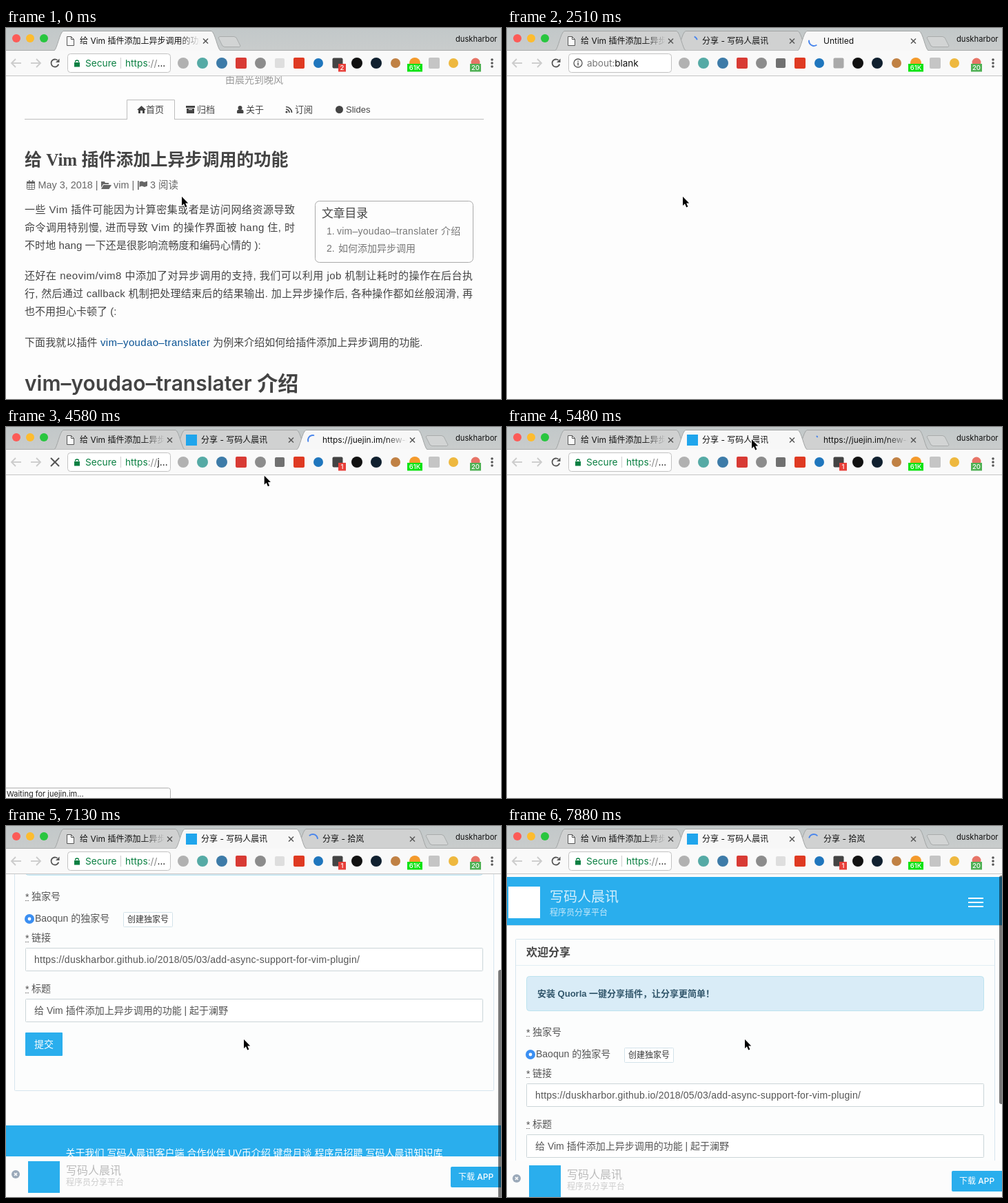
Recreate the animation shown at these times as an HTML page with a canvas. Size 718 px wide and 539 px high, loop 8 s.

```html
<!DOCTYPE html>
<html lang="zh">
<head>
<meta charset="utf-8">
<style>
html, body { margin: 0; width: 100%; height: 100%; overflow: hidden; background: #fff; }
canvas { display: block; width: 718px; height: 539px; }
</style>
</head>
<body>
<canvas id="stage"></canvas>
<script>
const W = 718, H = 539, LOOP = 8000, STEP = 148.6;
const canvas = document.getElementById('stage');
const ctx = canvas.getContext('2d');
const ratio = window.devicePixelRatio || 1;
canvas.width = W * ratio;
canvas.height = H * ratio;

const CJK = '"Noto Sans CJK SC", "Noto Sans CJK", sans-serif';
const UI = 'Inter, ' + CJK;
const PAGE = '"Liberation Sans", ' + CJK;
const SERIF = '"Liberation Serif", ' + CJK;
const BLUE = '#2aaeed';
const SITE = '写码人晨讯';
const USER = 'duskharbor';
const POST = '给 Vim 插件添加上异步调用的功能';

// ---- drawing helpers ----
function rect(x, y, w, h, fill) {
  ctx.fillStyle = fill;
  ctx.fillRect(x, y, w, h);
}

function box(x, y, w, h, r, fill, stroke) {
  const inset = stroke ? 0.5 : 0;
  ctx.beginPath();
  ctx.roundRect(x + inset, y + inset, w - 2 * inset, h - 2 * inset, r);
  if (fill) { ctx.fillStyle = fill; ctx.fill(); }
  if (stroke) { ctx.strokeStyle = stroke; ctx.lineWidth = 1; ctx.stroke(); }
}

function disc(x, y, r, fill) {
  ctx.beginPath();
  ctx.arc(x, y, r, 0, 7);
  ctx.fillStyle = fill;
  ctx.fill();
}

function poly(points, fill, stroke, width = 1, closed = true) {
  ctx.beginPath();
  points.forEach(([x, y]) => ctx.lineTo(x, y));
  if (closed) ctx.closePath();
  if (fill) { ctx.fillStyle = fill; ctx.fill(); }
  if (stroke) { ctx.strokeStyle = stroke; ctx.lineWidth = width; ctx.stroke(); }
}

function line(x1, y1, x2, y2, color, width = 1) {
  poly([[x1, y1], [x2, y2]], null, color, width, false);
}

// y is the vertical centre of the line of text
function text(str, x, y, size, color, opt = {}) {
  ctx.font = `${opt.weight || 400} ${size}px ${opt.font || PAGE}`;
  ctx.textAlign = opt.align || 'left';
  ctx.letterSpacing = (opt.spacing || 0) + 'px';
  ctx.fillStyle = color;
  if (opt.column) {
    const extra = opt.column - ctx.measureText(str).width;
    ctx.letterSpacing = extra / (str.length - 1) + 'px';
  }
  ctx.fillText(str, x, Math.round(y + size * 0.34));
  const width = ctx.measureText(str).width;
  ctx.letterSpacing = '0px';
  return x + width;
}

// ---- timing helpers ----
const smooth = u => u * u * (3 - 2 * u);

function track(k, keys, ease = u => u) {
  if (k <= keys[0][0]) return keys[0][1];
  for (let i = 1; i < keys.length; i++) {
    const [k0, a] = keys[i - 1], [k1, b] = keys[i];
    if (k <= k1) return a + (b - a) * ease((k - k0) / (k1 - k0));
  }
  return keys[keys.length - 1][1];
}

// ---- blog page ----
function blogIcons() {
  const c = '#444', m = '#666';
  poly([[190, 119], [196.5, 113], [203, 119], [201, 119], [201, 124], [198, 124], [198, 120],
    [195, 120], [195, 124], [192, 124], [192, 119]], c);
  rect(261, 113, 13, 3, c);
  rect(262, 117, 11, 7, c);
  rect(265, 118, 5, 1, '#fff');
  disc(339.5, 116, 3, c);
  ctx.beginPath();
  ctx.roundRect(335, 118.5, 9.5, 5.5, [3, 3, 1, 1]);
  ctx.fill();
  disc(407, 122, 1.6, c);
  for (const r of [5, 8.5]) {
    ctx.beginPath();
    ctx.arc(406, 123, r, -Math.PI / 2, 0);
    ctx.strokeStyle = c;
    ctx.lineWidth = 1.7;
    ctx.stroke();
  }
  disc(483.5, 118.5, 5.5, c);

  box(30, 223, 12, 12, 1, null, m);
  rect(30, 223, 12, 3, m);
  for (const x of [33, 38]) rect(x, 221, 1.5, 4, m);
  for (const x of [33.5, 37.5]) line(x, 226, x, 234, m, 0.7);
  for (const y of [228.5, 231.5]) line(31, y, 41, y, m, 0.7);
  poly([[138, 223], [143, 223], [144, 225], [149, 225], [149, 227], [141, 227], [138, 232]], m);
  poly([[141.5, 228], [153, 228], [149.5, 234], [138, 234]], m);
  rect(191, 222, 1.6, 13, m);
  poly([[193.5, 223.5], [197, 222.5], [200.5, 224], [205, 222.5], [205, 229.5], [201, 231],
    [197, 229.5], [193.5, 231]], m);
}

function blog() {
  const ink = '#444', soft = '#666';
  text('由晨光到晚风', 318, 75, 14, '#999');
  line(27, 132.5, 693, 132.5, '#bdbdbd');
  rect(175, 104, 70, 30, '#fdfdfd');
  poly([[175.5, 133], [175.5, 104.5], [244.5, 104.5], [244.5, 133]], null, '#bdbdbd', 1, false);
  [['首页', 203], ['归档', 277], ['关于', 348], ['订阅', 419], ['Slides', 493]]
    .forEach(([s, x]) => text(s, x, 118.5, 13, ink));
  text(POST, 27, 191.5, 25, ink, { weight: 700, font: SERIF });
  text('May 3, 2018 |', 46.5, 228, 14.4, soft);
  text('vim |', 156, 228, 14.4, soft);
  text('3 阅读', 209, 228, 14.4, soft);
  blogIcons();

  const narrow = { column: 392 }, wide = { column: 650 };
  text('一些 Vim 插件可能因为计算密集或者是访问网络资源导致', 27, 264, 15, ink, narrow);
  text('命令调用特别慢, 进而导致 Vim 的操作界面被 hang 住, 时', 27, 290, 15, ink, narrow);
  text('不时地 hang 一下还是很影响流畅度和编码心情的 ):', 27, 316, 15, ink, { spacing: 0.1 });
  text('还好在 neovim/vim8 中添加了对异步调用的支持, 我们可以利用 job 机制让耗时的操作在后台执',
    27, 360, 15, ink, wide);
  text('行, 然后通过 callback 机制把处理结束后的结果输出. 加上异步操作后, 各种操作都如丝般润滑, 再',
    27, 386, 15, ink, wide);
  text('也不用担心卡顿了 (:', 27, 412, 15, ink);
  let x = text('下面我就以插件 ', 27, 457, 15, ink, { spacing: 0.1 });
  x = text('vim–youdao–translater', x, 457, 15, '#0b5394', { spacing: 0.35 });
  text(' 为例来介绍如何给插件添加上异步调用的功能.', x, 457, 15, ink);
  text('vim–youdao–translater 介绍', 27, 517, 30, ink, { weight: 600, font: UI });

  box(448, 251, 230, 90, 6, '#fdfdfd', '#aaa');
  text('文章目录', 458, 269.5, 16.8, ink);
  text('1.', 465, 295, 14, '#777');
  text('vim–youdao–translater 介绍', 480, 295, 14, '#777', { spacing: 0.25 });
  text('2.', 465, 320, 14, '#777');
  text('如何添加异步调用', 482, 320, 14, '#777');
}

// ---- share page ----
function label(str, y) {
  text('*', 28, y + 1, 14, '#555');
  for (let x = 28; x < 33; x += 2) rect(x, y + 6, 1, 1, '#555');
  text(str, 37, y, 14, '#555');
}

function field(str, y, spacing = 0) {
  box(28, y, 664, 34, 1, '#fff', '#cbd5d8');
  text(str, 41, y + 17, 14, '#555', { spacing });
}

function form() {
  rect(0, 70, W, 70, BLUE);
  rect(0, 140, W, 1, '#cfdfe6');
  rect(2, 84, 46, 46, '#fff');
  text(SITE, 62, 99, 20, '#d4effc', { weight: 300 });
  text('程序员分享平台', 62, 122, 12, '#c4e8fa', { weight: 300 });
  for (const y of [100, 106, 112]) rect(669, y, 22, 2, '#fff');

  box(12, 160, 696, 418, 1, '#fcfdfd', '#d6e5ee');
  text('欢迎分享', 28, 180, 16, '#444', { weight: 600 });
  rect(13, 198, 694, 1, '#e2eef4');
  box(28, 214, 664, 51, 4, '#d9ecf7', '#bce3ef');
  text('安装 Quorla 一键分享插件，让分享更简单！', 44, 240, 13, '#31566b', { weight: 700 });
  label('独家号', 295);
  disc(34, 328, 7, '#3b8ff2');
  disc(34, 328, 2.4, '#fff');
  text('Baoqun 的独家号', 42, 327.5, 14, '#555');
  box(170, 318, 72, 22, 1, '#fff', '#d3e3ea');
  text('创建独家号', 176, 329, 12, '#333');
  label('链接', 355);
  field(`https://${USER}.github.io/2018/05/03/add-async-support-for-vim-plugin/`, 370, 0.23);
  label('标题', 429);
  field(POST + ' | 起于澜野', 444);
  box(28, 493, 54, 34, 1, BLUE);
  text('提交', 55, 510, 14, '#fff', { align: 'center', weight: 500 });
  rect(0, 628, W, 120, BLUE);
  text(`关于我们 ${SITE}客户端 合作伙伴 UV币介绍 键盘月谈 程序员招聘 ${SITE}知识库`,
    360, 668, 14, '#fff', { align: 'center' });
}

function appBar() {
  rect(0, 482, W, 70, '#fcfcfc');
  disc(14, 508, 6, '#9ba9b9');
  line(12, 506, 16, 510, '#fff', 1.6);
  line(16, 506, 12, 510, '#fff', 1.6);
  rect(32, 489, 46, 46, BLUE);
  text(SITE, 87, 503, 16, '#bbb', { weight: 300 });
  text('程序员分享平台', 87, 520, 12, '#ccc', { weight: 300 });
  box(645, 497, 76, 30, 2, BLUE);
  text('下载 APP', 656, 512, 12, '#fff', { weight: 500, font: UI });
}

function sharePage(k) {
  const range = 191;
  const scroll = track(k, [[41, 0], [42, -24], [43, -110], [44, -178], [45, -193],
    [46, -191], [47, -150], [48, -75], [49, -8], [50, 4]]);
  const bounce = scroll > 0 ? scroll : Math.min(0, scroll + range);
  ctx.save();
  ctx.translate(0, scroll);
  form();
  ctx.restore();
  ctx.save();
  ctx.translate(0, bounce);
  appBar();
  ctx.restore();
  if (k > 41) {
    const top = 71.5 - scroll * 136 / range;
    ctx.beginPath();
    ctx.roundRect(714, Math.max(72, top), 6, 332, 3);
    ctx.fillStyle = 'rgba(0,0,0,.52)';
    ctx.fill();
  }
}

// ---- browser frame ----
function spinner(x, y, k, k0, angle) {
  const t = (k - k0) * STEP, half = 666, turn = Math.floor(t / (2 * half));
  const phase = t / half - 2 * turn;
  const grow = smooth(Math.min(1, phase)), shrink = smooth(Math.max(0, phase - 1));
  const start = angle + t * 360 / 1568 + 265 * (turn + shrink);
  const rad = Math.PI / 180;
  ctx.beginPath();
  ctx.arc(x, y, 7, start * rad, (start + 8 + 265 * (grow - shrink)) * rad);
  ctx.strokeStyle = '#4a86ec';
  ctx.lineWidth = 2;
  ctx.lineCap = 'round';
  ctx.stroke();
  ctx.lineCap = 'butt';
}

function tab(x, w, drop, active, title, icon) {
  ctx.save();
  ctx.beginPath();
  ctx.rect(0, 0, W, 33);
  ctx.clip();
  ctx.translate(x, drop);
  ctx.beginPath();
  ctx.moveTo(0, 32.5);
  ctx.bezierCurveTo(4, 31, 8, 6, 13, 4.5);
  ctx.lineTo(w - 13, 4.5);
  ctx.bezierCurveTo(w - 8, 6, w - 4, 31, w, 32.5);
  ctx.fillStyle = active ? '#f7f7f7' : '#d0d1d1';
  ctx.fill();
  ctx.strokeStyle = '#a2a5a5';
  ctx.lineWidth = 1;
  ctx.stroke();
  if (active) rect(1, 32, w - 2, 1, '#f7f7f7');

  const fade = ctx.createLinearGradient(w - 60, 0, w - 29, 0);
  fade.addColorStop(0, '#111');
  fade.addColorStop(1, 'rgba(17,17,17,0)');
  ctx.save();
  ctx.beginPath();
  ctx.rect(30, 0, w - 59, 33);
  ctx.clip();
  text(title, 37, 19, 12, fade, { font: UI });
  ctx.restore();
  line(w - 25, 15.5, w - 18, 22.5, '#555', 1.4);
  line(w - 18, 15.5, w - 25, 22.5, '#555', 1.4);
  icon();
  ctx.restore();
}

function docIcon() {
  poly([[18.5, 12.5], [24.5, 12.5], [28.5, 16.5], [28.5, 25.5], [18.5, 25.5]], '#fafafa', '#555');
  poly([[24.5, 12.5], [24.5, 16.5], [28.5, 16.5]], null, '#555', 1, false);
}

function tabStrip(k) {
  const bg = ctx.createLinearGradient(0, 0, 0, 33);
  bg.addColorStop(0, '#c2c8c9');
  bg.addColorStop(1, '#c9cccc');
  rect(0, 0, W, 33, bg);
  ['#fc5b57', '#fdbc2f', '#28c63f'].forEach((c, i) => disc(15 + 20 * i, 15, 6, c));
  text(USER, 652, 16, 11.2, '#111', { font: UI });

  const nx = k < 7 ? 308 : 609;
  poly([[nx + 2, 12.5], [nx + 23, 12.5], [nx + 26, 14], [nx + 32, 26], [nx + 31, 27.5],
    [nx + 9, 27.5], [nx + 6, 26], [nx, 14]], '#d2d4d4', '#a9acac');
  line(0, 32.5, W, 32.5, '#a9acac');

  const pitch = k < 7 ? 228 : track(k, [[7, 228], [8, 194], [9, 176]]);
  const w = pitch + 13;
  const active = k < 7 ? 0 : k < 30 ? 2 : 1;
  const loaded = k >= 27;
  const tabs = [() => tab(70, w, 0, active === 0, POST, docIcon)];
  if (k >= 7) tabs.push(() => tab(70 + pitch, w, k === 7 ? 4 : 0, active === 1,
    k < 14 ? 'Untitled' : '分享 - ' + SITE, () => {
      if (loaded) rect(15, 11, 16, 16, '#1fa5ec');
      else if (k < 14) spinner(23, 19, k, 7, -90);
      else spinner(23, 19, k, 22, 117);
    }));
  if (k >= 8) tabs.push(() => tab(70 + 2 * pitch, w, k === 8 ? 4 : 0, active === 2,
    k < 15 ? 'Untitled' : k < 38 ? 'https://juejin.im/new-entry' : '分享 - 拾岚',
    () => spinner(23, 19, k, 34, -51)));
  for (let i = tabs.length - 1; i >= 0; i--) if (i !== active) tabs[i]();
  if (tabs[active]) tabs[active]();
}

function arrow(x, dir) {
  line(x - 7, 51, x + 7, 51, '#cbcbcb', 1.8);
  poly([[x + dir, 45], [x + 7 * dir, 51], [x + dir, 57]], null, '#cbcbcb', 1.8, false);
}

function badge(str, x, w, fill) {
  rect(x, 52, w, 11.5, fill);
  text(str, x + w / 2, 58, 9.5, '#fff', { align: 'center', font: UI, weight: 500 });
}

function extensions(k) {
  const square = (x, c, s = 16) => box(x - s / 2, 51 - s / 2, s, s, 2, c);
  disc(257, 51, 8, '#b1b1b1');
  disc(285, 51, 8, '#55aaa5');
  disc(313, 51, 8, '#3d7ba8');
  square(341, '#d83a34');
  disc(369, 51, 8, '#8c8c8c');
  square(397, k < 7 || k > 41 ? '#dedede' : '#707070', 14);
  square(425, '#df3a22');
  disc(453, 51, 7, '#1f76bd');
  const blank = k >= 7 && k < 15;
  square(481, blank ? '#a9a9a9' : '#444', 15);
  if (!blank) badge(k < 7 ? '2' : '1', 482, 11, '#e8403a');
  disc(509, 51, 8, '#111');
  disc(537, 51, 8, '#10202f');
  disc(565, 51, 7, '#c08144');
  disc(593, 51, 8, '#f49a2c');
  badge('61K', 582, 22, '#0be312');
  square(621, '#c5c5c5');
  disc(649, 51, 7, '#eeb83f');
  disc(681, 50, 6.5, '#e77467');
  badge('20', 673, 16, '#4fb054');
  for (const y of [46, 51, 56]) disc(705, y, 1.8, '#555');
}

function toolbar(k) {
  rect(0, 33, W, 36, '#f9f9f9');
  rect(0, 69, W, 1, '#c6c6c6');
  arrow(15, -1);
  arrow(43, 1);
  if (k >= 15 && k < 30) {
    line(65, 45, 77, 57, '#555', 2);
    line(77, 45, 65, 57, '#555', 2);
  } else {
    ctx.beginPath();
    ctx.arc(71, 51, 5.5, 0.3, 5.4);
    ctx.strokeStyle = '#555';
    ctx.lineWidth = 1.8;
    ctx.stroke();
    poly([[77.5, 44.5], [77.5, 50], [72, 50]], '#555');
  }
  box(89, 37, 150, 28, 4, '#fff', '#c2c2c2');
  const ui = { font: UI }, green = '#0b8043';
  if (k >= 7 && k < 15) {
    ctx.beginPath();
    ctx.arc(103, 51, 6, 0, 7);
    ctx.strokeStyle = '#555';
    ctx.lineWidth = 1.3;
    ctx.stroke();
    rect(102.3, 50, 1.5, 4.5, '#555');
    rect(102.3, 47.5, 1.5, 1.5, '#555');
    const x = text('about:', 116, 51, 13.5, '#777', ui);
    text('blank', x, 51, 13.5, '#111', ui);
  } else {
    rect(99, 50, 8, 6.5, green);
    ctx.beginPath();
    ctx.arc(103, 49.5, 2.5, Math.PI, 0);
    ctx.strokeStyle = green;
    ctx.lineWidth = 1.4;
    ctx.stroke();
    text('Secure', 115, 51, 13.7, green, ui);
    rect(166, 43, 1, 16, '#ccc');
    let x = text('https', 173, 51, 13.7, green, ui);
    x = text('://', x, 51, 13.7, '#888', ui);
    text(k >= 15 && k < 30 ? 'j...' : '...', x, 51, 13.7, '#111', ui);
  }
  extensions(k);
}

function pointer(k) {
  const x = track(k, [[16, 255], [20, 431], [23, 431], [29, 355], [34, 355], [39, 345]], smooth);
  const y = track(k, [[16, 245], [20, 221], [23, 221], [29, 18], [34, 18], [39, 310]], smooth);
  ctx.save();
  ctx.translate(x, y);
  ctx.lineJoin = 'round';
  const shape = [[0, 0], [0, 13], [3, 10.3], [5.2, 15.5], [7.4, 14.5], [5.2, 9.6], [9.2, 9.4]];
  poly(shape, '#000', '#fff', 2);
  poly(shape, '#000');
  ctx.restore();
}

function draw(t) {
  const k = Math.floor((t - 450 + 25) / STEP);
  ctx.setTransform(ratio, 0, 0, ratio, 0, 0);
  ctx.textBaseline = 'alphabetic';
  rect(0, 0, W, H, '#fdfdfd');
  if (k < 7) blog();
  else if (k >= 36) sharePage(k);
  if (k >= 15 && k < 30) {
    box(-4, 524, 243, 20, 3, '#fdfdfd', '#b0b0b0');
    text('Waiting for juejin.im...', 1, 533, 11, '#222', { font: UI });
  }
  tabStrip(k);
  toolbar(k);
  pointer(k);
}

function tick() {
  draw(performance.now() % LOOP);
  requestAnimationFrame(tick);
}
tick();
</script>
</body>
</html>
```
